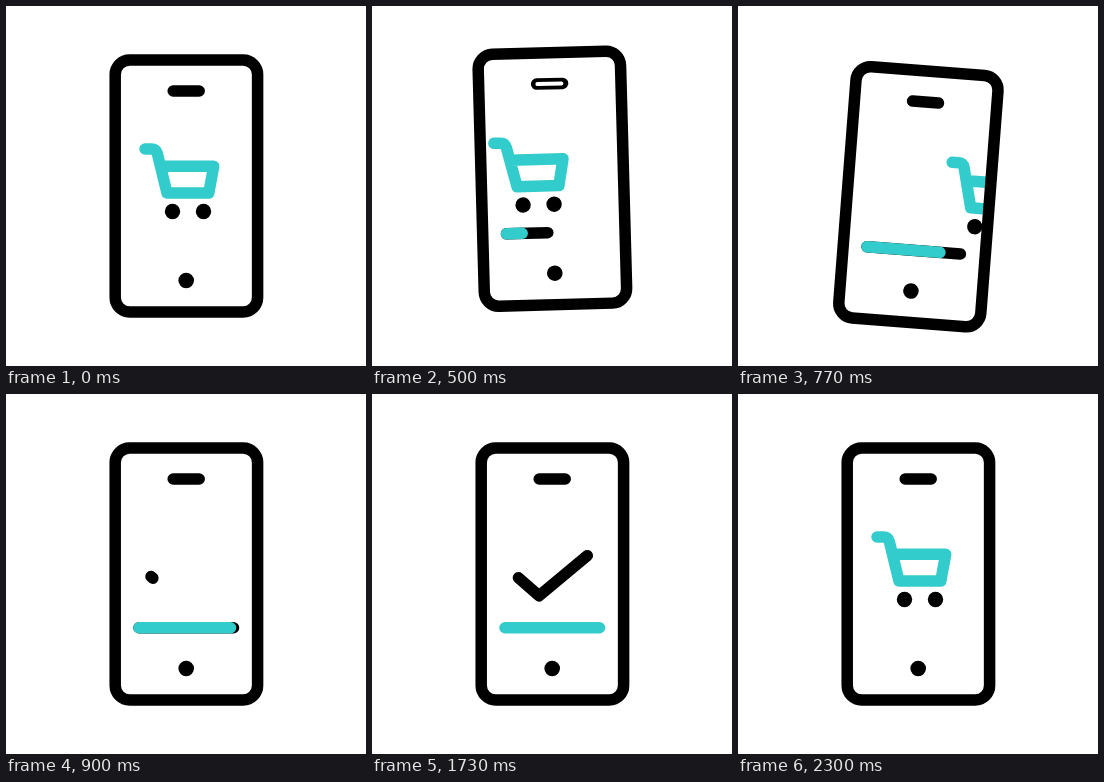
Animation of 360 by 360 pixels, one loop 2500 ms. Source, as an HTML page:

```html
<!DOCTYPE html>
<html lang="en">
<head>
<meta charset="utf-8">
<title>Mobile checkout</title>
<style>
  html, body { margin: 0; width: 100%; height: 100%; overflow: hidden; background: #fff; }
  svg { display: block; width: 100vw; height: 100vh; }
  .line { fill: none; stroke: #000; stroke-width: 11.5; stroke-linecap: round; stroke-linejoin: round; }
  .teal { stroke: #33cccc; }
  .flash { stroke: #fff; stroke-width: 4; }
</style>
</head>
<body>
<svg viewBox="0 0 360 360">
  <defs>
    <clipPath id="screen"><rect x="109" y="54" width="142.5" height="252" rx="14"/></clipPath>
  </defs>
  <g id="phone">
    <g clip-path="url(#screen)">
      <g id="cart">
        <path class="line teal" d="M139 143h6.5q4.5 0 5.8 4.5L161 187H202.8L207.7 160.3H155"/>
        <circle cx="166.5" cy="205.5" r="7.7"/>
        <circle cx="197.5" cy="205.5" r="7.7"/>
      </g>
    </g>
    <path id="track" class="line"/>
    <path id="fill" class="line teal"/>
    <path id="check" class="line" pathLength="1" d="M145 182.5L167 201.8L215.3 161.7"/>
    <rect class="line" x="109.2" y="54" width="142.4" height="252" rx="14.5"/>
    <path class="line" d="M167.2 85H193.2"/>
    <path id="flash" class="line flash" d="M168 85H192"/>
    <circle cx="180.2" cy="274.5" r="7.8"/>
  </g>
</svg>
<script>
  const LOOP = 2500;
  const BAR = { x: 133, y: 233.8, length: 94.5 };

  // Each track is a list of [time in ms, value], eased between neighbours.
  const tracks = {
    lift: [[200, 0], [395, -17], [690, 17], [885, 0]],
    tilt: [[200, 0], [395, -5], [690, 7], [885, 0]],
    cartOut: [[230, 0], [530, -16.5], [933, 120]],
    cartIn: [[1900, -120], [2270, 0]],
    trackEnd: [[243, 0], [804, 1]],
    fillEnd: [[328, 0], [975, 1]],
    barStart: [[1750, 0], [2100, 1]],
    checkEnd: [[870, 0], [1165, 1]],
    checkStart: [[1705, 0], [1990, 1]]
  };

  const $ = id => document.getElementById(id);
  const [phone, cart, track, fill, check, flash] =
    ['phone', 'cart', 'track', 'fill', 'check', 'flash'].map($);

  const ease = p => (1 - Math.cos(Math.PI * p)) / 2;

  function at(name, t) {
    const keys = tracks[name];
    if (t <= keys[0][0]) return keys[0][1];
    for (let i = 1; i < keys.length; i++) {
      const [t0, a] = keys[i - 1];
      const [t1, b] = keys[i];
      if (t < t1) return a + (b - a) * ease((t - t0) / (t1 - t0));
    }
    return keys[keys.length - 1][1];
  }

  function show(el, on) {
    el.style.display = on ? '' : 'none';
  }

  function drawBar(el, start, end, on) {
    const x = p => BAR.x + BAR.length * p;
    el.setAttribute('d', `M${x(start)} ${BAR.y}H${x(end) + 0.01}`);
    show(el, on && start < 1);
  }

  function draw(t) {
    phone.setAttribute('transform',
      `translate(0 ${at('lift', t)}) rotate(${at('tilt', t)} 180.2 180)`);

    const cartX = at(t < 1500 ? 'cartOut' : 'cartIn', t);
    cart.setAttribute('transform', `translate(${cartX} 0)`);

    const barStart = at('barStart', t);
    drawBar(track, barStart, at('trackEnd', t), t > 243 && t < 1000);
    drawBar(fill, barStart, at('fillEnd', t), t > 328);

    const from = at('checkStart', t);
    const length = at('checkEnd', t) - from;
    check.setAttribute('stroke-dasharray', `${length} 3`);
    check.setAttribute('stroke-dashoffset', -from);
    show(check, length > 0.001);

    show(flash, t >= 500 && t < 530);
  }

  const begin = performance.now();
  function tick() {
    draw((performance.now() - begin) % LOOP);
    requestAnimationFrame(tick);
  }
  tick();
</script>
</body>
</html>
```
